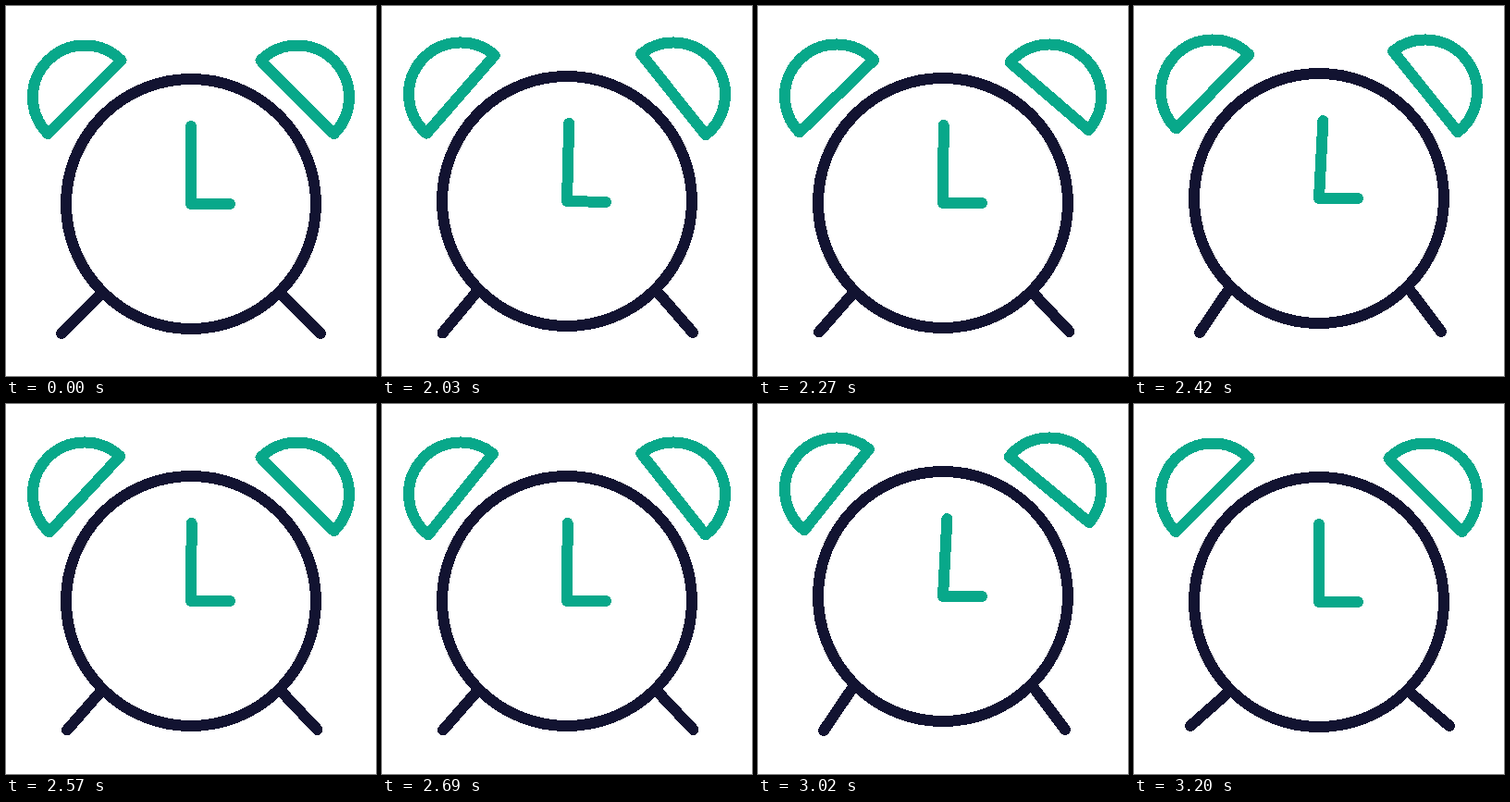
Animation of 400 by 400 pixels, one loop 3230 ms. Source, as an HTML page:

```html
<!DOCTYPE html>
<html lang="en">
<head>
<meta charset="utf-8">
<title>Alarm clock</title>
<style>
  html, body { margin: 0; width: 100%; height: 100%; overflow: hidden; background: #fff; }
  svg { display: block; width: 100vw; height: 100vh; }
  path, circle { fill: none; stroke-width: 12; stroke-linecap: round; stroke-linejoin: round; }
  .dark { stroke: #121331; }
  .green { stroke: #08a88a; }
</style>
</head>
<body>
<svg viewBox="0 0 400 400" shape-rendering="crispEdges">
  <g id="clock">
    <path id="legL" class="dark"/>
    <path id="legR" class="dark"/>
    <circle class="dark" cx="200" cy="214" r="135"/>
    <path id="hour" class="green" d="M200 214H242"/>
    <path id="minute" class="green" d="M200 214V130"/>
    <path id="bellL" class="green" d="M45.4 138.1A56 56 0 0 1 124.6 58.9Z"/>
    <path id="bellR" class="green" d="M275.4 58.9A56 56 0 0 1 354.6 138.1Z"/>
  </g>
</svg>
<script>
  const LOOP = 3230, HOLD = 2030, STEP = 30;
  const $ = id => document.getElementById(id);
  const mix = (a, b, k) => a + (b - a) * k;

  // Linear interpolation through [step, value] keys
  function track(keys, n) {
    const i = keys.findIndex(k => k[0] >= n);
    if (i < 0) return keys[keys.length - 1][1];
    if (i === 0) return keys[0][1];
    const [a, b] = [keys[i - 1], keys[i]];
    return mix(a[1], b[1], (n - a[0]) / (b[0] - a[0]));
  }

  // Rest, then up and down every two steps, then settle
  function bounce(rest, up, down, end) {
    const keys = [[0, rest]];
    for (let n = 2; n <= 36; n += 2) keys.push([n, n % 4 ? up : down]);
    return [...keys, [40, end]];
  }

  const lift = bounce(0, -6, 4, 0);
  const feet = {
    legL: [104.5, bounce(60, 71, 61, 61), bounce(354, 359, 348, 348)],
    legR: [295.5, bounce(340, 332, 341, 341), bounce(354, 358, 348, 348)]
  };
  const hourTurn = [[0, 0], [2, 2.6], [4, 0]];
  // Swing phase in turns
  const phaseL = [[0, 0], [1, 0.1], [9, 1.98], [19, 4.05], [23, 5.2], [30, 6.5], [40, 8.5]];
  const phaseR = [[0, 0], [9, 1.89], [19, 4.5], [23, 5.25], [30, 6.75], [40, 9]];
  const swing = (phase, n) => 6.7 * Math.sin(2 * Math.PI * track(phase, n));

  const turn = (id, deg, x, y) => $(id).setAttribute('transform', `rotate(${deg} ${x} ${y})`);

  function draw(n) {
    const dy = track(lift, n);
    $('clock').setAttribute('transform', `translate(0 ${dy})`);
    for (const id in feet) {
      const [x, fx, fy] = feet[id];
      $(id).setAttribute('d', `M${x} 309.5L${track(fx, n)} ${track(fy, n)}`);
    }
    turn('minute', -dy / 2, 200, 214);
    turn('hour', track(hourTurn, n), 200, 214);
    turn('bellL', -swing(phaseL, n), 85, 98.5);
    turn('bellR', swing(phaseR, n), 315, 98.5);
  }

  const start = performance.now();
  function tick() {
    const t = (performance.now() - start) % LOOP;
    draw(t < HOLD ? 0 : Math.floor((t - HOLD) / STEP) + 1);
    requestAnimationFrame(tick);
  }
  tick();
</script>
</body>
</html>
```
